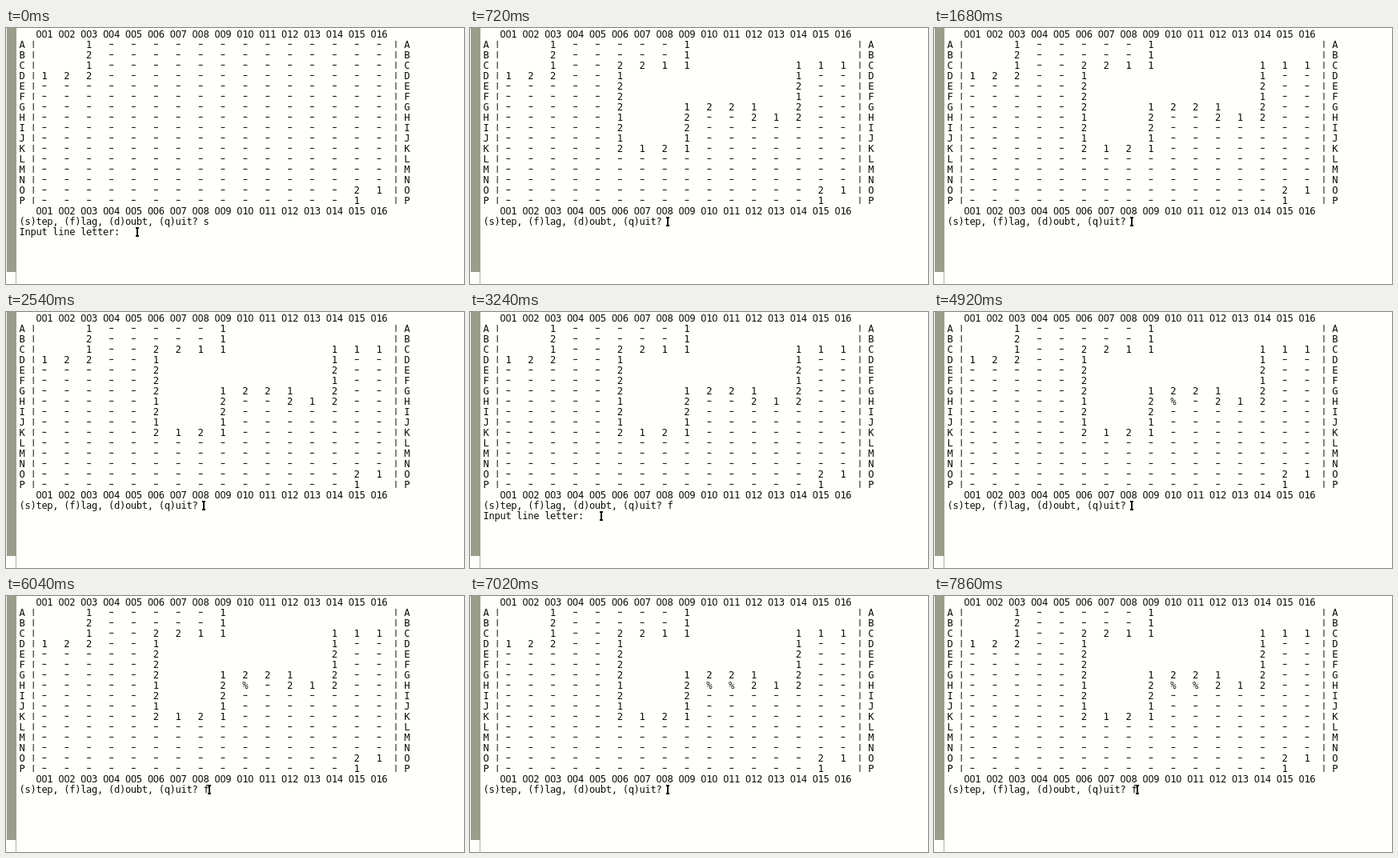
Write an HTML page that moves like this. It is 572 by 320 pixels and loops after 8000 ms.

```html
<!DOCTYPE html>
<html lang="en">
<head>
<meta charset="utf-8">
<title>Terminal minesweeper</title>
<style>
  html, body { margin: 0; width: 100%; height: 100%; overflow: hidden; background: #fffffc; }
  svg { display: block; width: 100%; height: 100%; }
  text { fill: #0c0c08; text-anchor: middle; font: 12.2px "DejaVu Sans Mono", monospace; }
  .zero { font: 12.6px Roboto, sans-serif; }
  .bar, .dash { font-size: 9px; font-weight: bold; }
  #cursor { fill: #0c0c06; }
</style>
</head>
<body>
<svg viewBox="0 0 572 320" preserveAspectRatio="none">
  <rect x="1" y="0" width="12" height="305" fill="#9c9c8a"/>
  <rect x="12" y="305" width="1" height="15" fill="#b4b4a4"/>
  <g id="screen"></g>
  <path id="cursor" d="M-2 0h4v2h-1v8h1v2h-4v-2h1v-8h-1z"/>
</svg>
<script>
const LOOP = 8000, LEFT = 16.7, CELL = 6.967, LINE = 13, BASE = 12;
const PROMPT = "(s)tep, (f)lag, (d)oubt, (q)uit? ";
const ASK_LINE = "Input line letter:   ";
const ASK_COLUMN = "Input column number: ";

const screen = document.getElementById("screen");
const cursor = document.getElementById("cursor");

const hidden = "-".repeat(16);
const tail = ["-".repeat(14) + "21", "-".repeat(14) + "1 "];
const start = [
  "  1" + "-".repeat(13),
  "  2" + "-".repeat(13),
  "  1" + "-".repeat(13),
  "122" + "-".repeat(13),
  ...Array(10).fill(hidden),
  ...tail
];
const opened = [
  "  1-----1       ",
  "  2-----1       ",
  "  1--2211    111",
  "122--1       1--",
  "-----2       2--",
  "-----2       1--",
  "-----2  1221 2--",
  "-----1  2--212--",
  "-----2  2-------",
  "-----1  1-------",
  "-----2121-------",
  hidden, hidden, hidden,
  ...tail
];

function flag(board, row, column) {
  return board.map((s, i) => i === row ? s.slice(0, column - 1) + "%" + s.slice(column) : s);
}
const flagged = flag(opened, 7, 10);
const flaggedTwice = flag(flagged, 7, 11);

// time, board, command, line letter, column number
const steps = [
  [0, start, "s", ""],
  [140, start, "s", "B"],
  [280, start, "s", "B", ""],
  [420, start, "s", "B", "1"],
  [520, start, "s", "B", "12"],
  [720, opened, ""],
  [2800, opened, "f"],
  [3200, opened, "f", ""],
  [3900, opened, "f", "H"],
  [4200, opened, "f", "H", ""],
  [4480, opened, "f", "H", "1"],
  [4600, opened, "f", "H", "10"],
  [4760, flagged, ""],
  [5860, flagged, "f"],
  [6140, flagged, "f", ""],
  [6280, flagged, "f", "H"],
  [6420, flagged, "f", "H", ""],
  [6700, flagged, "f", "H", "1"],
  [6780, flagged, "f", "H", "11"],
  [6900, flaggedTwice, ""],
  [7560, flaggedTwice, "f"]
];

// How far each kind of glyph sits above the baseline
const lift = { plain: 0, zero: 0, bar: 2, dash: 1.7 };
const styles = { "0": "zero", "|": "bar", "-": "dash" };

function printLine(line, row) {
  for (const style in lift) {
    const xs = [];
    let chars = "";
    [...line].forEach((c, i) => {
      if (c === " " || (styles[c] || "plain") !== style) return;
      xs.push((LEFT + (i + 0.5) * CELL).toFixed(2));
      chars += c === "-" ? "\u2212" : c;
    });
    if (!chars) continue;
    const text = document.createElementNS("http://www.w3.org/2000/svg", "text");
    text.setAttribute("class", style);
    text.setAttribute("x", xs.join(" "));
    text.setAttribute("y", BASE + row * LINE - lift[style]);
    text.textContent = chars;
    screen.append(text);
  }
}

const header = "   " + Array.from({ length: 16 }, (_, i) => String(i + 1).padStart(3, "0")).join(" ");

function boardLine(cells, i) {
  const letter = String.fromCharCode(65 + i);
  return letter + " | " + [...cells].join("   ") + "  | " + letter;
}

function draw([, board, command, letter, column]) {
  const lines = [header, ...board.map(boardLine), header, PROMPT + command];
  if (letter !== undefined) lines.push(ASK_LINE + letter);
  if (column !== undefined) lines.push(ASK_COLUMN + column);
  screen.replaceChildren();
  lines.forEach(printLine);
  const row = lines.length - 1;
  const x = LEFT + lines[row].length * CELL + 0.5;
  cursor.setAttribute("transform", `translate(${Math.round(x)} ${BASE + row * LINE - 10})`);
}

let shown;
function tick() {
  const t = performance.now() % LOOP;
  const step = steps.findLast(s => s[0] <= t);
  if (step !== shown) draw(shown = step);
  requestAnimationFrame(tick);
}
tick();
</script>
</body>
</html>
```
